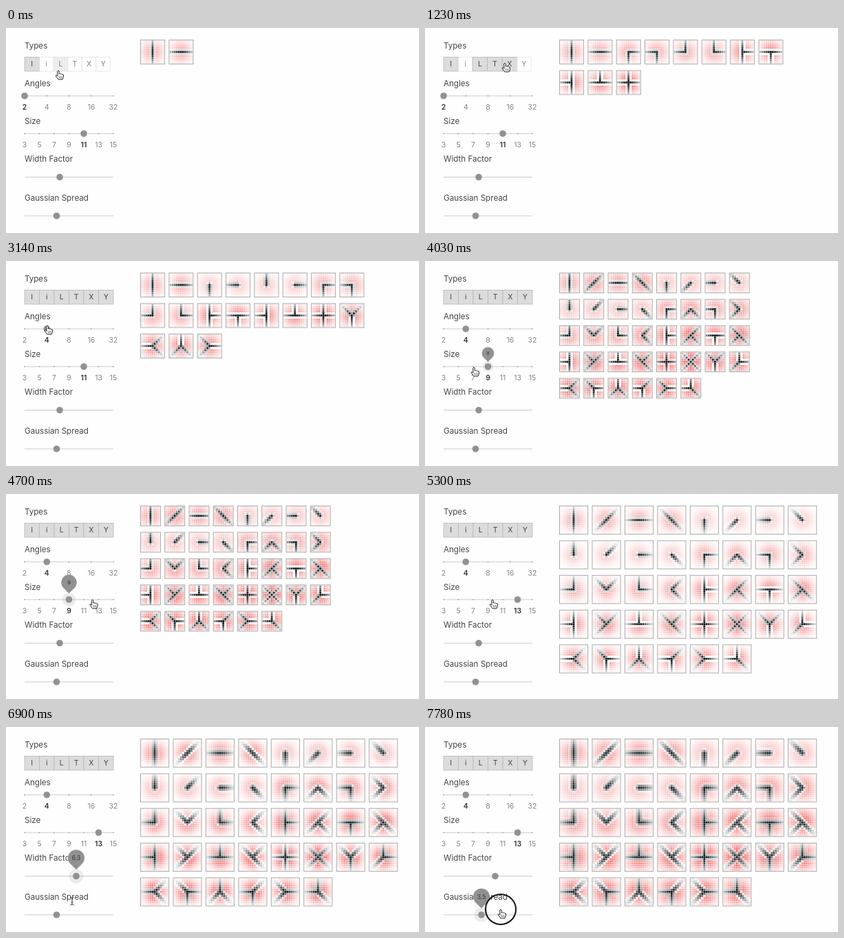
These frames come from a looping animation (600x299 px, 7.81 s). An HTML page with a canvas:

```html
<!DOCTYPE html>
<html lang="en">
<head>
<meta charset="utf-8">
<style>
html, body { margin: 0; width: 100%; height: 100%; overflow: hidden; background: #fefefe; }
canvas, svg { position: absolute; left: 0; top: 0; width: 600px; height: 299px; }
text { font-family: Inter, Roboto, sans-serif; }
.title { font-size: 11.6px; fill: #444; }
.tick { font-size: 10.4px; fill: #858585; text-anchor: middle; }
.tick.on { fill: #333; font-weight: 600; }
.type { font-size: 10.5px; text-anchor: middle; }
.pin { font-size: 8.5px; fill: #333; text-anchor: middle; }
</style>
</head>
<body>
<canvas id="grid"></canvas>
<svg id="ui" viewBox="0 0 600 299"></svg>
<script>
const LOOP = 7810;
const LEFT = 27, RAIL = 129;
const ui = document.getElementById('ui');
const canvas = document.getElementById('grid');
const ctx = canvas.getContext('2d');
const ratio = window.devicePixelRatio || 1;
canvas.width = 600 * ratio;
canvas.height = 299 * ratio;

function add(tag, attrs, parent = ui, text) {
  const el = document.createElementNS('http://www.w3.org/2000/svg', tag);
  set(el, attrs);
  if (text !== undefined) el.textContent = text;
  parent.appendChild(el);
  return el;
}
function set(el, attrs) {
  for (const k in attrs) el.setAttribute(k, attrs[k]);
}

const clamp = v => Math.max(0, Math.min(1, v));
const ease = v => v * v * (3 - 2 * v);

// Eased value along rows of [time, ...values]
function track(rows, t) {
  let i = 0;
  while (i < rows.length - 2 && t >= rows[i + 1][0]) i++;
  const a = rows[i], b = rows[i + 1];
  const k = ease(clamp((t - a[0]) / (b[0] - a[0])));
  return a.slice(1).map((v, j) => v + (b[j + 1] - v) * k);
}

// Arms are compass directions in eighths of a turn, clockwise from north
const types = [
  { name: 'I', arms: [0, 4], period: 4, from: -1 },
  { name: 'i', arms: [4], period: 8, from: 2150 },
  { name: 'L', arms: [2, 4], period: 8, from: 300 },
  { name: 'T', arms: [0, 2, 4], period: 8, from: 700 },
  { name: 'X', arms: [0, 2, 4, 6], period: 2, from: 1180 },
  { name: 'Y', arms: [7, 1, 4], period: 8, from: 1650 }
];

const cursorPath = [
  [0, 76, 62], [230, 77, 55], [330, 78, 55], [640, 98, 54], [740, 98, 54],
  [1100, 116, 51], [1260, 116, 51], [1580, 141, 53], [1720, 141, 53],
  [2050, 58, 54], [2240, 58, 54], [2650, 30, 92], [2780, 30, 93],
  [3080, 60, 94], [3230, 60, 94], [3560, 112, 153], [3680, 112, 153],
  [3850, 91, 154], [4030, 71, 155], [4200, 71, 155], [4450, 91, 154],
  [4800, 134, 154], [4980, 134, 154], [5300, 98, 154], [5650, 78, 215],
  [5850, 78, 215], [6500, 102, 216], [6680, 102, 216], [6900, 96, 254],
  [7180, 74, 272], [7400, 74, 272], [7780, 110, 266], [7810, 110, 266]
];
const widthPath = [[5850, 78], [6500, 102]];
const spreadPath = [[7420, 73.5], [7760, 82]];

const sliders = [
  { title: 'Angles', y: 99, base: 85, stops: [2, 4, 8, 16, 32], presses: [[3160, 3420]],
    at: t => LEFT + (t < 3100 ? 0 : RAIL / 4) },
  { title: 'Size', y: 154, base: 140, stops: [3, 5, 7, 9, 11, 13, 15], presses: [[3660, 3992], [4560, 4980]],
    at: t => LEFT + RAIL / 6 * (t < 3820 ? 4 : t < 4810 ? 3 : 5) },
  { title: 'Width Factor', y: 217.5, base: 195, presses: [[5830, 6905]],
    at: t => track(widthPath, t)[0], value: x => (x - LEFT) * 0.084 },
  { title: 'Gaussian Spread', y: 274, base: 252, presses: [[7380, 9000]],
    at: t => track(spreadPath, t)[0], value: x => (x - LEFT) * 0.0636 }
];

add('text', { x: LEFT, y: 30, class: 'title' }, ui, 'Types');
for (const type of types) {
  type.box = add('rect', { y: 42.5, height: 20.5, 'stroke-width': 0.8 });
  type.label = add('text', { y: 56, class: 'type' }, ui, type.name);
}
for (const s of sliders) {
  add('text', { x: LEFT, y: s.base, class: 'title' }, ui, s.title);
  add('line', { x1: LEFT, x2: LEFT + RAIL, y1: s.y, y2: s.y, stroke: '#cbcbcb', 'stroke-width': 1 });
  s.ticks = (s.stops || []).map((n, i) => {
    const x = LEFT + RAIL * i / (s.stops.length - 1);
    add('circle', { cx: x, cy: s.y, r: 1, fill: '#b0b0b0' });
    return add('text', { x, y: s.y + 20, class: 'tick' }, ui, n);
  });
  s.halo = add('circle', { cy: s.y, fill: '#888', opacity: 0.16 });
  s.knob = add('circle', { cy: s.y, r: 4.8, fill: '#919191' });
}
for (const s of sliders) {
  s.pin = add('g', {});
  add('path', { d: 'M0 -9.5L-8.5 -18A12 12 0 1 1 8.5 -18Z', fill: '#919191' }, s.pin);
  s.pinText = add('text', { y: -23.4, class: 'pin' }, s.pin);
}

const ring = add('circle', { r: 22, fill: 'none', stroke: '#111', 'stroke-width': 2 });
const hand = add('g', { 'stroke-linejoin': 'round', 'stroke-linecap': 'round' });
add('path', {
  d: 'M-1.2 1Q0 -.8 1.2 1V5Q2.4 4 3.4 5.2Q4.8 4.4 5.6 5.8Q7.4 5.2 7.5 7V9.5L6 13H0L-3.6 8.2Q-4 6.4 -2.4 6.8L-1.2 8Z',
  fill: '#fff', stroke: '#222', 'stroke-width': 1
}, hand);
add('path', { d: 'M1.5 8.5V11M3.4 8.5V11M5.2 8.5V11', fill: 'none', stroke: '#222', 'stroke-width': 0.6 }, hand);
const beam = add('path', {
  d: 'M-2.5 -5.5Q0 -5.5 0 -4Q0 -5.5 2.5 -5.5M0 -4V4M-2.5 5.5Q0 5.5 0 4Q0 5.5 2.5 5.5M-1.3 1.5H1.3',
  fill: 'none', stroke: '#333', 'stroke-width': 1
});

// Zero-sum line filter under a Gaussian envelope, scaled to a peak of one
function kernel(arms, size, width, spread) {
  const half = (size - 1) / 2, cells = [];
  let sum = 0, total = 0;
  for (let y = -half; y <= half; y++) for (let x = -half; x <= half; x++) {
    let d = Infinity;
    for (const arm of arms) {
      const a = arm * Math.PI / 4, dx = Math.sin(a), dy = -Math.cos(a);
      const along = Math.max(0, x * dx + y * dy);
      d = Math.min(d, Math.hypot(x - along * dx, y - along * dy));
    }
    const s = width * 0.155;
    const line = Math.exp(-d * d / (2 * s * s));
    const weight = Math.exp(-(x * x + y * y) / (2 * spread * spread));
    sum += line * weight;
    total += weight;
    cells.push({ x: x + half, y: y + half, line, weight });
  }
  const mean = sum / total;
  for (const c of cells) c.v = (c.line - mean) * c.weight / (1 - mean);
  return cells;
}

const CELL = 3.05;
function drawTile(x, y, cells, size) {
  const side = size * CELL + 1.5;
  ctx.fillStyle = '#fff';
  ctx.fillRect(x, y, side, side);
  for (const c of cells) {
    const strength = Math.pow(Math.abs(c.v), 0.8);
    ctx.fillStyle = c.v > 0
      ? `rgba(12,18,20,${Math.min(1, strength)})`
      : `rgba(232,62,58,${Math.min(0.8, strength * 1.25)})`;
    ctx.fillRect(x + 0.8 + c.x * CELL, y + 0.8 + c.y * CELL, CELL - 0.3, CELL - 0.3);
  }
  ctx.strokeStyle = '#aaa';
  ctx.lineWidth = 1;
  ctx.strokeRect(x, y, side, side);
}

let drawn = '';
function drawGrid(t) {
  const size = t < 3900 ? 11 : t < 4840 ? 9 : 13;
  const step = t < 3220 ? 2 : 1;
  const width = sliders[2].value(sliders[2].at(t)).toFixed(1);
  const spread = sliders[3].value(sliders[3].at(t)).toFixed(1);
  const active = types.filter(type => t >= type.from);
  const key = [size, step, width, spread, active.length].join();
  if (key === drawn) return;
  drawn = key;
  ctx.setTransform(ratio, 0, 0, ratio, 0, 0);
  ctx.clearRect(0, 0, 600, 299);
  let n = 0;
  for (const type of active) for (let turn = 0; turn < type.period; turn += step) {
    const cells = kernel(type.arms.map(a => a + turn), size, +width, +spread);
    const x = 195.5 + (n % 8) * (size * CELL + 7.8);
    const y = 17.5 + Math.floor(n / 8) * (size * CELL + 10.95);
    drawTile(x, y, cells, size);
    n++;
  }
}

function drawTypes(t, cx, cy) {
  let x = LEFT;
  for (const type of types) {
    const on = t >= type.from, w = on ? 21.5 : 20.6;
    const hover = cy > 42 && cy < 64 && cx >= x && cx < x + w;
    set(type.box, {
      x, width: w,
      fill: on ? '#dcdcdc' : hover ? '#eee' : '#fefefe',
      stroke: on ? '#b8b8b8' : '#d8d8d8',
      'stroke-dasharray': on ? 'none' : '2 1'
    });
    set(type.label, { x: x + w / 2, fill: on ? '#444' : '#808080' });
    x += w;
  }
}

function drawSlider(s, t) {
  const x = s.at(t);
  const index = s.stops ? Math.round((x - LEFT) / RAIL * (s.stops.length - 1)) : -1;
  const open = Math.max(...s.presses.map(([on, off]) =>
    Math.min(clamp((t - on) / 150), 1 - clamp((t - off) / 150))));
  s.ticks.forEach((tick, i) => tick.classList.toggle('on', i === index));
  set(s.knob, { cx: x });
  set(s.halo, { cx: x, r: 10.5 * open });
  set(s.pin, { transform: `translate(${x} ${s.y}) scale(${open})`, visibility: open > 0 ? 'visible' : 'hidden' });
  s.pinText.textContent = s.stops ? s.stops[index] : s.value(x).toFixed(1);
}

function render(t) {
  const [cx, cy] = track(cursorPath, t);
  const overText = t > 6790 && t < 7060;
  drawGrid(t);
  drawTypes(t, cx, cy);
  sliders.forEach(s => drawSlider(s, t));
  const place = `translate(${cx} ${cy})`;
  set(hand, { transform: place, visibility: overText ? 'hidden' : 'visible' });
  set(beam, { transform: place, visibility: overText ? 'visible' : 'hidden' });
  set(ring, { cx, cy, visibility: t > 7640 ? 'visible' : 'hidden' });
}

const start = performance.now();
function frame() {
  render((performance.now() - start) % LOOP);
  requestAnimationFrame(frame);
}
frame();
</script>
</body>
</html>
```
